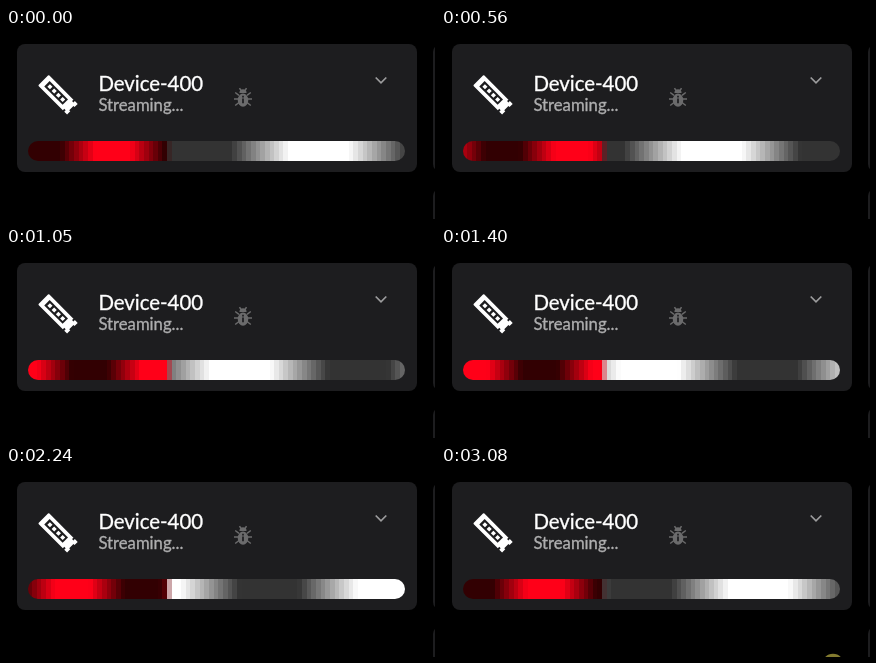
Write an HTML page that moves like this. It is 429 px wide and 191 px high and loops after 3220 ms.

```html
<!DOCTYPE html>
<html lang="en">
<head>
<meta charset="utf-8">
<title>LED strip</title>
<style>
  html, body { margin: 0; width: 100%; height: 100%; overflow: hidden; background: #000; }
  svg { display: block; width: 429px; height: 191px; }
  text { font-family: Lato, "Open Sans", sans-serif; stroke-width: .35px; }
</style>
</head>
<body>
<svg viewBox="0 0 429 191">
  <defs><clipPath id="pill"><rect x="22" y="113" width="377" height="20" rx="10"/></clipPath></defs>
  <rect width="429" height="191"/>
  <g fill="#1d1d1f">
    <rect x="11" y="16" width="400" height="128" rx="8"/>
    <rect x="427" y="16" width="400" height="128" rx="8"/>
    <rect x="427" y="160" width="400" height="128" rx="8"/>
  </g>

  <!-- strip icon -->
  <g transform="translate(37.4 52.2) rotate(45)">
    <path fill="#fff" d="M1-7.5H35V-5.5H37V-7.5H41V-3H39.5V3H41V7.5H37V5.5H35V7.5H1Q0 7.5 0 6.5V-6.5Q0-7.5 1-7.5Z"/>
    <rect x="5" y="-3.8" width="26" height="7.6" fill="#1d1d1f"/>
    <path d="M7.4 0H30" stroke="#fff" stroke-width="3.6" stroke-dasharray="3.7 2.3"/>
  </g>

  <text x="92.4" y="62.7" font-size="20.4" fill="#fff" stroke="#fff">Device-400</text>
  <text x="92.4" y="83.4" font-size="16.7" fill="#aeaeaf" stroke="#aeaeaf">Streaming...</text>

  <!-- bug icon -->
  <g transform="translate(237 69.5)" fill="none" stroke="#6b6b6c" stroke-width="1.5">
    <path d="M-3.5-9.3L-2-7M3.5-9.3L2-7M-7.8-5L-4-2.2M7.8-5L4-2.2M-9 1.6H9M-7.8 8L-4 5M7.8 8L4 5"/>
    <path d="M-3.6-4.4A3.6 3.8 0 0 1 3.6-4.4Z" fill="#6b6b6c" stroke="none"/>
    <ellipse cy="2.6" rx="5.3" ry="6.6" fill="#6b6b6c" stroke="none"/>
    <path d="M0-1.8V0M0 1V5.8" stroke="#1d1d1f" stroke-width="1.7"/>
  </g>

  <path d="M369.7 49.5L375 54.8L380.3 49.5" fill="none" stroke="#9c9c9d" stroke-width="1.7"/>
  <g id="leds" clip-path="url(#pill)" shape-rendering="crispEdges"></g>
  <circle id="spot" cx="392" cy="198.7" r="11" fill="#837b2f"/>
</svg>
<script>
const LOOP = 3220, TICK = 70, WAVE = 3147;
const COUNT = 81, SPLIT = 30, LEFT = 22, PITCH = 377 / COUNT;
const RED_LEN = 139, WHITE_LEN = 236;
const heldTicks = new Set([2, 4, 7, 16, 19, 21, 29, 34, 39, 42, 45]);
const DARK_RED = [50, 0, 2], RED = [255, 0, 24];
const DARK = [51, 51, 51], WHITE = [255, 255, 255];

const leds = document.getElementById("leds");
const spot = document.getElementById("spot");
const edge = i => Math.floor(LEFT + i * PITCH + 1e-6);
const cells = Array.from({ length: COUNT }, (_, i) => {
  const cell = document.createElementNS("http://www.w3.org/2000/svg", "rect");
  cell.setAttribute("x", edge(i));
  cell.setAttribute("y", 113);
  cell.setAttribute("width", edge(i + 1) - edge(i));
  cell.setAttribute("height", 20);
  return leds.appendChild(cell);
});

const mix = (a, b, k) => a.map((v, i) => v + (b[i] - v) * k);

// Trapezoid: a quarter bright, a quarter dark, linear ramps between
function level(x, center, length) {
  const d = (x - center) / length;
  const away = Math.abs(d - Math.round(d));
  return Math.min(1, Math.max(0, 1.5 - 4 * away));
}

function draw(time) {
  let tick = Math.floor((time % LOOP) / TICK);
  if (heldTicks.has(tick)) tick--;
  const t = tick * TICK, turn = t / WAVE;
  const redCenter = 107 + RED_LEN * turn;
  const whiteCenter = 313.5 - WHITE_LEN * turn;

  cells.forEach((cell, i) => {
    const x = LEFT + (i + 0.5) * PITCH;
    const red = mix(DARK_RED, RED, level(x, redCenter, RED_LEN));
    const white = mix(DARK, WHITE, level(x, whiteCenter, WHITE_LEN));
    const color = i < SPLIT ? red : i > SPLIT ? white : mix(white, red, 0.35);
    cell.setAttribute("fill", `rgb(${color.map(Math.round)})`);
  });
  spot.setAttribute("visibility", t >= 3080 ? "visible" : "hidden");
}

const start = performance.now();
function frame() {
  draw(performance.now() - start);
  requestAnimationFrame(frame);
}
frame();
</script>
</body>
</html>
```
